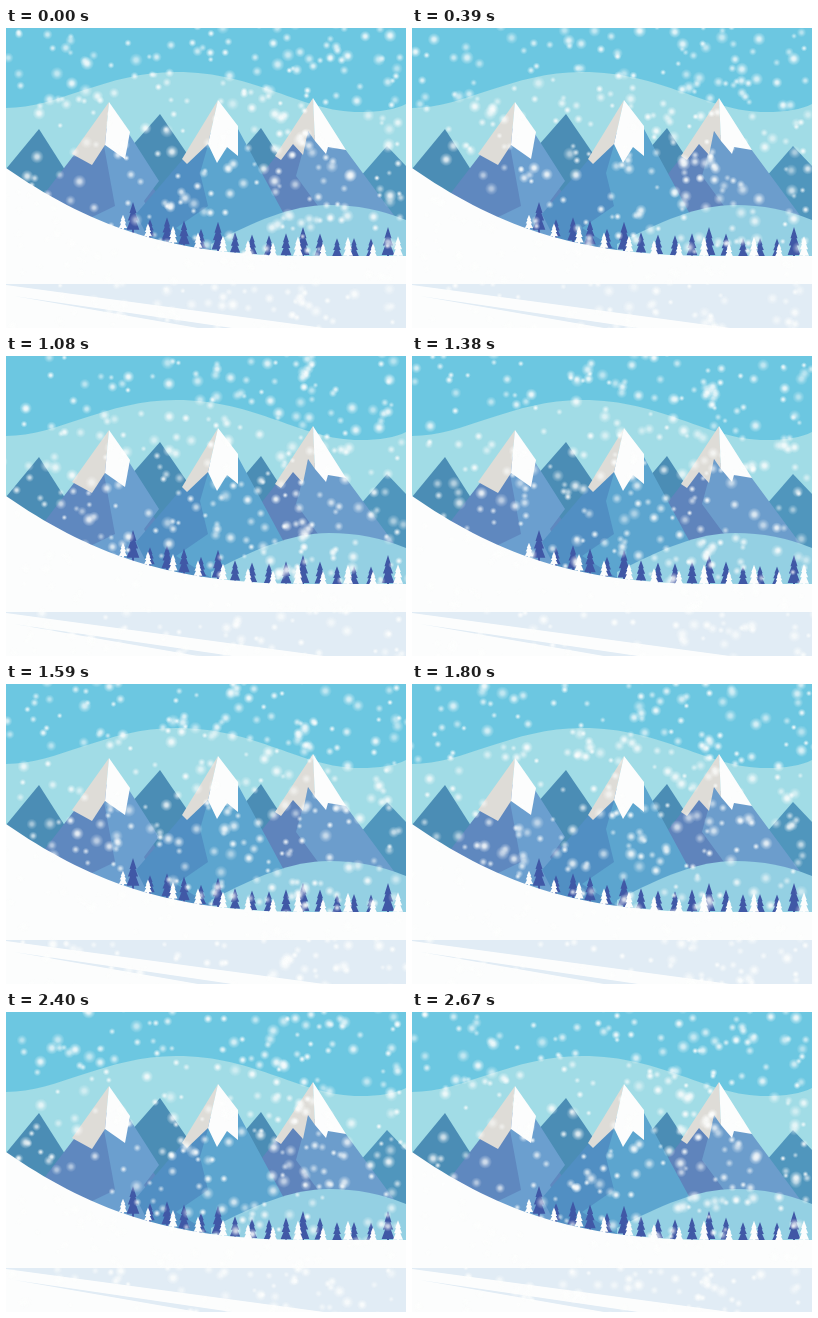
An HTML page with a canvas that plays this animation: 400x300 px, repeating every 2700 ms.

```html
<!DOCTYPE html>
<html lang="en">
<head>
<meta charset="utf-8">
<title>Snowy mountains</title>
<style>
  html, body { margin: 0; width: 100%; height: 100%; overflow: hidden; }
  svg, canvas { position: absolute; left: 0; top: 0; width: 400px; height: 300px; }
</style>
</head>
<body>
<svg viewBox="0 0 400 300">
  <rect width="400" height="90" fill="#6cc7e1"/>
  <path fill="#a1dce6" d="M0 80C52 80 100 44 170 44C252 44 294 84 354 84Q384 84 400 76V240H0Z"/>

  <g fill="#4b8db5">
    <path d="M33 101L0 141V200H96Z"/>
    <path d="M154 86L96 152L130 200H232Z"/>
    <path d="M255 100L215 147V200H320Z"/>
    <path fill="#5096bd" d="M381 118L340 165V200H400V138Z"/>
  </g>

  <path fill="#5f88bf" d="M68 127L32 174L100 215H190L100 100Z"/>
  <path fill="#6b9fcf" d="M123 106L153 153L138 173L160 215H120L80 192L109 178L98 118Z"/>
  <path fill="#5f84bc" d="M270 128L245 160L275 195L330 205L303 100Z"/>
  <path fill="#6c9dcc" d="M339 121L390 190L350 210H300L312 178L290 148L302 104Z"/>
  <path fill="#518fc3" d="M177 131L130 186L150 225H230L210 100Z"/>
  <path fill="#5ca5cf" d="M232 101L280 190L270 228H215L170 200L202 178L194 145L202 117Z"/>

  <g fill="#dedcd7">
    <path d="M103 74L66 126L86 137L99 117Z"/>
    <path d="M212 72L176 131L181 136L202 116Z"/>
    <path d="M307 70L269 128L275 132L287 116L297 127L302 103L309 113Z"/>
  </g>
  <g fill="#fcfdfd">
    <path d="M103 74L99 117L119 131L124 104Z"/>
    <path d="M212 72L202 116L211 135L221 119L232 128V98Z"/>
    <path d="M307 70L309 113L320 126L322 119L340 122Z"/>
  </g>

  <path fill="#94d0e3" d="M205 216C250 193 285 177 323 177Q364 177 400 192V240H205Z"/>
  <path id="darkTrees" fill="#4058a6"/>
  <path id="whiteTrees" fill="#fcfdfd"/>
  <path fill="#fcfdfd" d="M0 140C80 195 160 228 300 228H400V300H0Z"/>
  <path fill="#e1ecf5" d="M0 256H400V300H318L0 257ZM8 268L226 300H192Z"/>
</svg>
<canvas width="400" height="300"></canvas>
<script>
const LOOP = 2700, STEP = 30, SPAN = 320;

let seed = 29;
const random = () => (seed = seed * 16807 % 2147483647) / 2147483647;

const ground = x => 229 - 89 * Math.max(0, 1 - x / 300) ** 2.3;

function treePath(x, height) {
  const base = ground(x) + 1, top = base - height, w = 2 + height * 0.14;
  const tier = (a, b, k) =>
    `M${x} ${top + height * a}L${x + w * k} ${top + height * b}H${x - w * k}Z`;
  return tier(0, 0.36, 0.55) + tier(0.15, 0.6, 0.8) + tier(0.35, 0.9, 1) +
    `M${x - 1} ${base - height * 0.2}h2V${base}h-2Z`;
}

function treeRow(count, first, gap, height) {
  return Array.from({ length: count }, (_, i) =>
    treePath(first + gap * i, height(i))).join("");
}
darkTrees.setAttribute("d", treeRow(16, 127, 17, i => i % 5 ? 19 + random() * 8 : 31));
whiteTrees.setAttribute("d", treeRow(12, 117, 25, () => 14 + random() * 8));

const flakes = Array.from({ length: 300 }, (_, i) => ({
  x: random() ** 0.8 * 400,
  y: random() * SPAN,
  r: 3 + random() * 4,
  alpha: 0.5 + random() * 0.4,
  sway: 2 + random() * 5,
  phase: random() * Math.PI * 2,
  slow: i % 3 === 0
}));

const ctx = document.querySelector("canvas").getContext("2d");

const sprite = document.createElement("canvas");
sprite.width = sprite.height = 32;
const pen = sprite.getContext("2d");
const glow = pen.createRadialGradient(16, 16, 0, 16, 16, 16);
[[0, 1], [0.25, 0.9], [0.6, 0.4], [1, 0]].forEach(([at, a]) =>
  glow.addColorStop(at, `rgba(253,254,253,${a})`));
pen.fillStyle = glow;
pen.fillRect(0, 0, 32, 32);

function draw(now) {
  const p = Math.floor(now % LOOP / STEP) * STEP / LOOP;
  ctx.clearRect(0, 0, 400, 300);
  for (const f of flakes) {
    // Slow flakes repeat every half span, so half a span closes their loop
    const span = f.slow ? SPAN / 2 : SPAN;
    const x = f.x + f.sway * Math.sin(p * Math.PI * 2 + f.phase);
    ctx.globalAlpha = f.alpha;
    for (let y = (f.y + p * span) % span - 10; y < 310; y += span)
      ctx.drawImage(sprite, x - f.r, y - f.r, f.r * 2, f.r * 2);
  }
  requestAnimationFrame(draw);
}
requestAnimationFrame(draw);
</script>
</body>
</html>
```
